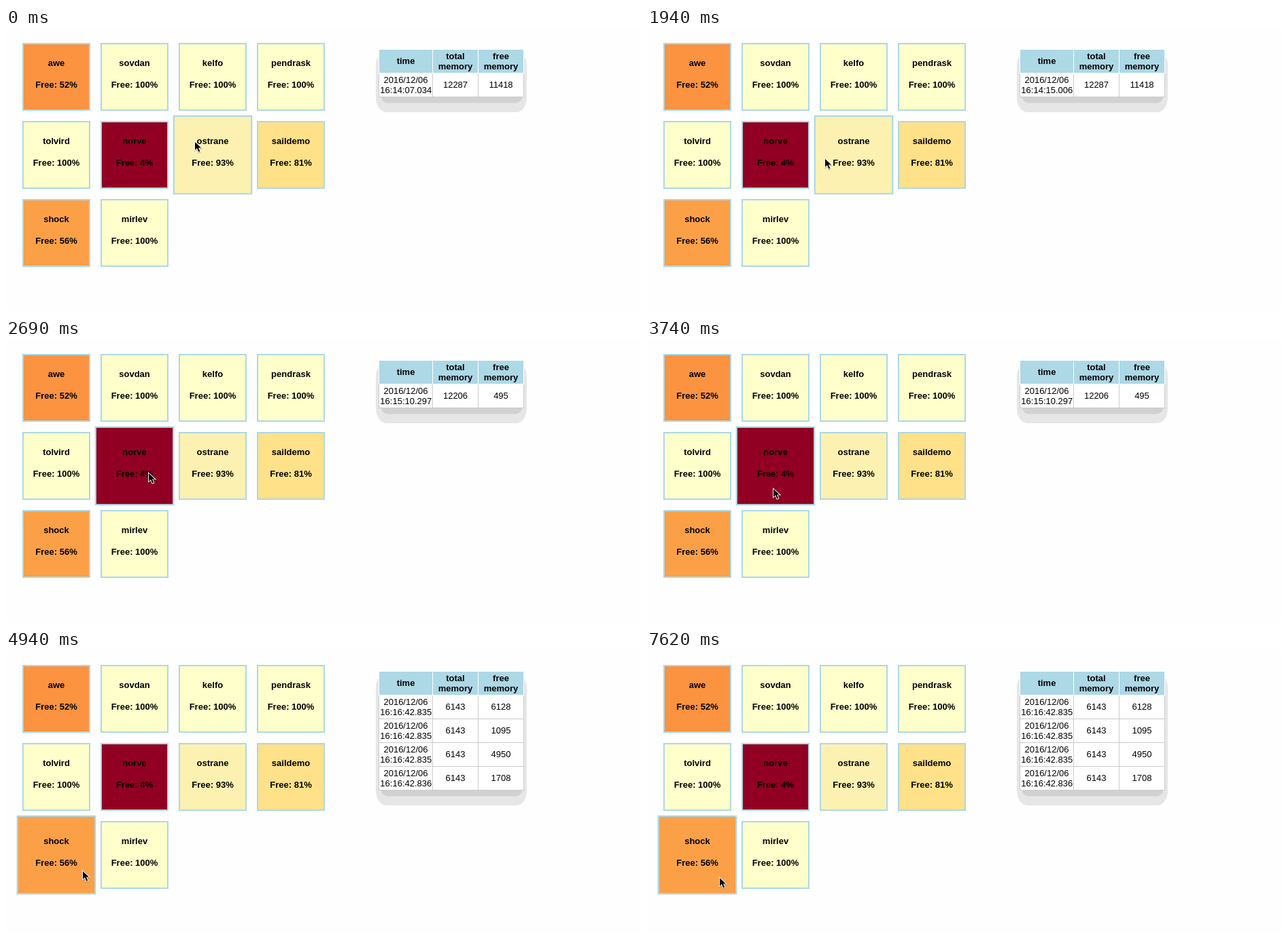
These frames come from a looping animation (934 by 417 pixels, 8 s). An HTML page:

```html
<!DOCTYPE html>
<html lang="en">
<head>
<meta charset="utf-8">
<title>Free memory</title>
<style>
  html, body { margin: 0; width: 100%; height: 100%; overflow: hidden; background: #fefefe; }
  svg { display: block; }
  text { font: 13px "Liberation Sans", Arial, sans-serif; text-anchor: middle; }
  .b { font-weight: bold; }
  .line { stroke: #ccc; fill: none; }
  #cursor { filter: drop-shadow(0 1px .7px #0005); }
</style>
</head>
<body>
<svg width="934" height="417" viewBox="0 0 934 417">
  <g id="tiles"></g>
  <g id="table"></g>
  <path id="cursor" d="M1 2V13.8L4 11L6.3 16.5L8.3 15.7L6 10.4H10Z" stroke="#fff" stroke-width="1.8" paint-order="stroke"/>
</svg>
<script>
const LOOP = 8000, BLUE = '#add8e6';
const $ = id => document.getElementById(id);

const hosts = [
  ['awe', 52, '#fb9341'], ['sovdan', 100, '#ffffcb'], ['kelfo', 100, '#ffffcb'], ['pendrask', 100, '#ffffcb'],
  ['tolvird', 100, '#ffffcb'], ['norve', 4, '#910022'], ['ostrane', 93, '#fdf1b1'], ['saildemo', 81, '#fee189'],
  ['shock', 56, '#fca047'], ['mirlev', 100, '#ffffcb']
];
const NORVE = 5, OSTRANE = 6, SHOCK = 8, MIRLEV = 9, NONE = -1;

// Table rows: clock, total memory, free memory
const early = [['16:14:07.034', 12287, 11418]];
const rowsOf = {
  [OSTRANE]: [['16:14:15.006', 12287, 11418]],
  [NORVE]: [['16:15:10.297', 12206, 495]],
  [MIRLEV]: [['16:13:05.340', 12287, 12264]],
  [SHOCK]: [['16:16:42.835', 6143, 6128], ['16:16:42.835', 6143, 1095],
            ['16:16:42.835', 6143, 4950], ['16:16:42.836', 6143, 1708]]
};

// Cursor steps: start time, x, y, hovered tile
const steps = [
  [0, 277, 166, OSTRANE], [140, 273, 174, OSTRANE], [290, 267, 183, OSTRANE], [440, 263, 188, OSTRANE],
  [590, 261, 191, OSTRANE], [2090, 250, 194, OSTRANE], [2240, 237, 197, NONE], [2390, 225, 197, NORVE],
  [2540, 216, 196, NORVE], [2690, 209, 196, NORVE], [2840, 204, 196, NORVE], [2990, 197, 198, NORVE],
  [3140, 191, 200, NORVE], [3740, 185, 219, NORVE], [3890, 178, 246, NONE], [4040, 169, 273, MIRLEV],
  [4190, 161, 284, MIRLEV], [4490, 156, 290, MIRLEV], [4640, 143, 303, MIRLEV], [4790, 121, 317, SHOCK],
  [4940, 112, 324, SHOCK], [5090, 109, 326, SHOCK], [5240, 108, 327, SHOCK], [5390, 107, 328, SHOCK],
  [5990, 107, 329, SHOCK], [6880, 107, 330, SHOCK], [7030, 107, 331, SHOCK], [7470, 106, 333, SHOCK],
  [7620, 106, 334, SHOCK]
];

const text = (x, y, s, cls = '') => `<text x="${x}" y="${y}" class="${cls}">${s}</text>`;
const rect = (x, y, w, h, fill, more = '') =>
  `<rect x="${x}" y="${y}" width="${w}" height="${h}" fill="${fill}" ${more}/>`;

function tile([name, free, fill], i, big) {
  const cx = 74 + i % 4 * 115, cy = 72 + (i >> 2) * 115;
  const half = big ? 57.2 : 49;
  return rect(cx - half, cy - half, half * 2, half * 2, fill, `stroke="${BLUE}" stroke-width="${big ? 2.2 : 2}"`) +
    text(cx, cy - 16, name, 'b') + text(cx, cy + 16, `Free: ${free}%`, 'b');
}

function drawTiles(hover) {
  const order = hosts.map((_, i) => i).filter(i => i !== hover);
  if (hover >= 0) order.push(hover);
  return order.map(i => tile(hosts[i], i, i === hover)).join('');
}

function drawTable(rows) {
  if (!rows) return '';
  const end = 66 + rows.length * 35;
  let s = rect(544, 34, 222, end - 11, '#e6e6e6', 'rx="15" ry="22"') +
    rect(552, 60, 207, end - 50.5, '#d1d1d1', 'rx="9"') +
    rect(548, 31, 214, end - 30, '#fff');
  for (const [x, w] of [[549, 78], [628, 66], [695, 66]]) s += rect(x, 32, w, 34, BLUE);
  s += text(588, 53, 'time', 'b') + text(661, 46, 'total', 'b') + text(661, 61, 'memory', 'b') +
    text(728, 46, 'free', 'b') + text(728, 61, 'memory', 'b');
  for (const x of [548.5, 627.5, 694.5, 761.5]) s += `<path class="line" d="M${x} 67V${end + 1}"/>`;
  rows.forEach(([clock, total, free], i) => {
    const y = 66 + i * 35;
    s += `<path class="line" d="M548 ${y + 35.5}H762"/>` +
      text(588, y + 15, '2016/12/06') + text(588.3, y + 30, clock) +
      text(661, y + 22, total) + text(728, y + 22, free);
  });
  return s;
}

let shown;
function frame(now) {
  const t = now % LOOP;
  const [, x, y, hover] = steps.findLast(s => s[0] <= t);
  const rows = t < 1940 ? early : rowsOf[hover];
  const key = hover + '|' + (rows === early);
  if (key !== shown) {
    shown = key;
    $('tiles').innerHTML = drawTiles(hover);
    $('table').innerHTML = drawTable(rows);
  }
  $('cursor').setAttribute('transform', `translate(${x} ${y})`);
}

const start = performance.now();
function loop() {
  frame(performance.now() - start);
  requestAnimationFrame(loop);
}
loop();
</script>
</body>
</html>
```
